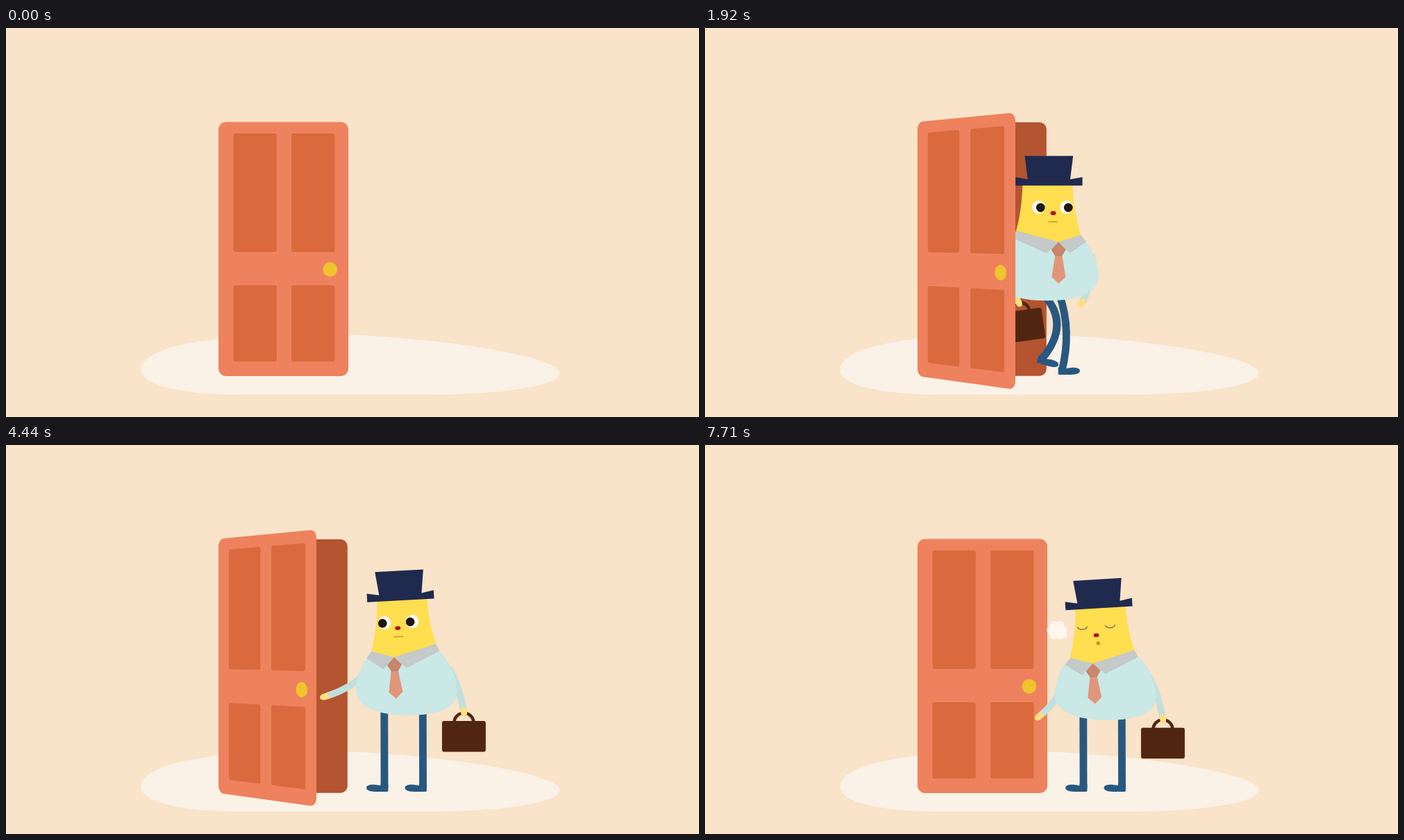
Recreate the animation shown at these times as an HTML page with a canvas. Size 998x561 px, loop 8000 ms.

```html
<!DOCTYPE html>
<html lang="en">
<head>
<meta charset="utf-8">
<title>Door</title>
<style>
  html, body { margin: 0; width: 100%; height: 100%; overflow: hidden; background: #f9e3c9; }
  canvas { display: block; width: 998px; height: 561px; }
</style>
</head>
<body>
<canvas id="stage" width="998" height="561"></canvas>
<script>
const ctx = document.getElementById('stage').getContext('2d');
const LOOP = 8000, TURN = 3720, MID = 577.75, WAIST = 382, RAD = Math.PI / 180;
const C = {
  wall: '#f9e3c9', floor: '#faf1e7', door: '#ee825e', panel: '#da6a3d', knob: '#f0c42d',
  hole: '#b45431', shirt: '#c9e8e6', sleeve: '#c2dfde', skin: '#ffde4f', hand: '#ffdf7f',
  collar: '#c4c9c9', knot: '#c9866a', tie: '#e0967a', hat: '#1f2a4e', leg: '#28587f',
  bag: '#512611', nose: '#b5121b', mouth: '#bf9724', lid: '#8d8158', puff: '#fff7ef', pupil: '#24150f'
};

const clamp = (v, a, b) => Math.max(a, Math.min(b, v));
const part = (t, a, b) => clamp((t - a) / (b - a), 0, 1);
const smooth = p => p * p * (3 - 2 * p);
const easeOut = p => 1 - (1 - p) ** 3;
const mix = (a, b, p) => a + (b - a) * p;

function fill(d, color) {
  ctx.fillStyle = color;
  ctx.fill(new Path2D(d));
}
function poly(pts, color) {
  ctx.fillStyle = color;
  ctx.beginPath();
  pts.forEach(([x, y]) => ctx.lineTo(x, y));
  ctx.closePath();
  ctx.fill();
}
// Outline with two equal halves; points are offsets from the axis.
function even(axis, pts, color) {
  const right = pts.map(([x, y]) => [axis + x, y]);
  const left = pts.map(([x, y]) => [axis - x, y]).reverse();
  poly([...right, ...left], color);
}
function oval(x, y, rx, ry, color, turn = 0) {
  ctx.fillStyle = color;
  ctx.beginPath();
  ctx.ellipse(x, y, rx, ry, turn, 0, 7);
  ctx.fill();
}
function arch(x, y, rx, ry, from, to, width, color) {
  ctx.strokeStyle = color;
  ctx.lineWidth = width;
  ctx.beginPath();
  ctx.ellipse(x, y, rx, ry, 0, from, to);
  ctx.stroke();
}
function box(x, y, w, h, r, color) {
  ctx.fillStyle = color;
  ctx.beginPath();
  ctx.roundRect(x, y, w, h, r);
  ctx.fill();
}
function bend(x1, y1, cx, cy, x2, y2, width, color) {
  ctx.strokeStyle = color;
  ctx.lineWidth = width;
  ctx.beginPath();
  ctx.moveTo(x1, y1);
  ctx.quadraticCurveTo(cx, cy, x2, y2);
  ctx.stroke();
}
function scoped(fn) {
  ctx.save();
  fn();
  ctx.restore();
}
function mirror() {
  ctx.translate(2 * MID, 0);
  ctx.scale(-1, 1);
}

// Door leaf, hinged on its left edge and seen in perspective.
const DOOR = { x: 306, y: 135.5, w: 187, h: 366.5, eye: 286 };

function drawLeaf(open) {
  const cut = 46 * open * open, k = 0.01475 * cut ** 0.45, w = DOOR.w - cut;
  const project = (x, y) => {
    const u = (x - DOOR.x) / DOOR.w, s = 1 / (1 - k * u);
    return [DOOR.x + w * u * (1 - k) * s, DOOR.eye + (y - DOOR.eye) * s];
  };
  const slab = (x, y, w, h, r, color) => {
    const pts = [];
    for (let i = 0; i < 36; i++) {
      const q = Math.floor(i / 9), a = (q + (i % 9) / 8) * Math.PI / 2;
      const cx = q === 0 || q === 3 ? x + w - r : x + r;
      const cy = q < 2 ? y + h - r : y + r;
      pts.push(project(cx + r * Math.cos(a), cy + r * Math.sin(a)));
    }
    poly(pts, color);
  };
  slab(DOOR.x, DOOR.y, DOOR.w, DOOR.h, 11, C.door);
  for (const x of [327.5, 411]) {
    slab(x, 152, 62.5, 171, 3, C.panel);
    slab(x, 371, 62.5, 110, 3, C.panel);
  }
  slab(456.5, 337.8, 20.6, 20.6, 10.3, C.knob);
}

function drawRoom() {
  ctx.fillStyle = C.wall;
  ctx.fillRect(0, 0, 998, 561);
  fill('M194.5 493C194.5 462 280 441.5 450 441.5C590 441.5 797.5 471 797.5 497.5' +
       'C797.5 517 710 529 600 529L345 529C260 529 194.5 517 194.5 493Z', C.floor);
}

// A stride swings one foot for half a cycle, then rests it for the other half.
const STRIDE = 113, CYCLE = 763, WALK_END = 2453;

function footAt(t, begin, from, rest) {
  const cycles = (Math.min(t, WALK_END) - begin) / CYCLE, n = Math.floor(cycles);
  const swing = Math.min(1, (cycles - n) * 2), settle = part(t, 2640, 3030);
  const x = from + STRIDE * (n + smooth(swing));
  return {
    x: mix(x, rest, smooth(settle)),
    lift: 12 * Math.sin(Math.PI * swing) + 5 * Math.sin(Math.PI * settle)
  };
}

function drawLegs(t, shift, dy, walk) {
  const back = footAt(t, 1690, 410, 555), front = footAt(t, 1690 + CYCLE / 2, 514, 610.5);
  const half = clamp((front.x - back.x - 16) * 0.8, -27.75, 27.75);
  [[back, -half], [front, half]].forEach(([foot, side]) => {
    const hip = 583 + shift + side, top = 384 + dy;
    const tilt = clamp((hip - foot.x - 5) * 1.1, 0, 30) + foot.lift * 1.5;
    const y = 494.5 - tilt * 0.27 - foot.lift;
    const knee = (hip + foot.x) / 2 + walk * (16 + foot.lift * 2.2);
    bend(hip, top, knee, (top + y) / 2 - 4 * walk, foot.x, y, 10.8, C.leg);
    scoped(() => {
      ctx.translate(foot.x, y);
      ctx.rotate(tilt * RAD);
      fill('M-5.4 -5L-5.4 4Q-5.4 5.3 -4 5.4L13 5.6C22 5.2 26 3 26 0C26 -4 20 -5 13 -4.6L5.4 -3.4L5.4 -6Z', C.leg);
    });
  });
}

function drawBag(x, y, turn) {
  scoped(() => {
    ctx.translate(x, y);
    ctx.rotate(turn * RAD);
    arch(0, 14.5, 14, 14, Math.PI, 0, 4.6, C.bag);
    box(-31.5, 12, 63, 44.5, 3, C.bag);
  });
}

function drawArm(sx, sy, cx, cy, hx, hy) {
  const a = Math.atan2(hy - cy, hx - cx);
  bend(sx, sy, cx, cy, hx - 3 * Math.cos(a), hy - 3 * Math.sin(a), 9.6, C.sleeve);
  oval(hx, hy, 7, 4.7, C.hand, a);
}

function drawSwing(t) {
  const s = Math.cos(2 * Math.PI * (t - 1920) / CYCLE) * (1 - smooth(part(t, 2250, 2600)));
  const x = 505 + 30 * s, y = 392 + 2 * s;
  drawBag(x, y, 2 - 10 * s);
  drawArm(520, 325, 505 + 10 * s, 355, x, y);
  drawArm(640, 325, 653 - 8 * s, 360, 651.5 - 25.5 * s, 392 + 3 * s);
}

function drawReach(reach, pull) {
  drawBag(659.4, 386, 0);
  drawArm(638, 322, 653, 348, 659.4, 385);
  const x = mix(mix(504, 448, reach), 481, pull), y = mix(mix(392, 356, reach), 382, pull);
  drawArm(522, 325, 500 + 6 * pull, 350 + 12 * pull, x, y);
}

function drawEyes(closed) {
  for (const x of [564, 604]) {
    if (closed) arch(x + 0.5, 251, 7, 4.8, 0.1, Math.PI - 0.1, 1.7, C.lid);
    else {
      oval(x, 257, 9.4, 9.4, '#fff');
      oval(x + 2.7, 257.5, 6.4, 6.4, C.pupil);
    }
  }
}

function drawHead(t) {
  fill('M541 222C540 250 537 272 531.5 291L592.5 308L624.5 297C618 272 613 250 613 222Z', C.skin);
  fill('M531.5 291L592.5 307L575.5 323.5L526.8 301.5ZM592.5 307L624.5 297L632.5 306.5L609 323.5Z', C.collar);
  even(592.8, [[4.8, 325], [10, 357.5], [0, 367]], C.tie);
  even(592.6, [[0, 307], [10.6, 318], [4.9, 327.5]], C.knot);
  even(578.8, [[34.8, 183], [30.6, 216.8], [48.2, 213.5], [48.2, 225.8]], C.hat);
  drawEyes(t >= 6870);
  oval(585, 265.5, 4, 2.9, C.nose);
  if (t < 7320) box(578, 277.2, 13.5, 1.5, 0.5, C.mouth);
  else oval(583, 277.5, 2.8, 2.8, C.mouth);
}

function drawPuff(p) {
  if (!p) return;
  scoped(() => {
    ctx.translate(526 - 19 * p, 274 - 7 * p);
    ctx.scale(p, p);
    oval(0, 0, 10, 10, C.puff);
    for (let i = 0; i < 6; i++) {
      const a = i * Math.PI / 3;
      oval(8.6 * Math.cos(a), 8 * Math.sin(a), 6.3, 6, C.puff);
    }
    poly([[4, 11], [12, 4], [15.5, 10.5]], C.puff);
  });
}

function drawMan(t) {
  const left = t >= TURN;
  const shift = Math.min(0, (t - 2485) * 0.148);
  const walk = 1 - smooth(part(t, 2640, 3030));
  const reach = easeOut(part(t, 4230, 4730)), pull = part(t, 5040, 5460);
  const sag = smooth(part(t, 7320, 7710));
  const bob = 1.75 + 1.75 * Math.cos(4 * Math.PI * (t - 1920) / CYCLE);
  const dy = -2 + walk * bob + 7 * sag;
  const tilt = -3.8 * reach * (1 - part(t, 5040, 6120)) - 3.5 * sag;

  scoped(() => {
    ctx.translate(shift, left ? 9.7 * sag : dy);
    if (left) drawReach(reach, pull);
    else drawSwing(t);
  });
  scoped(() => {
    if (left) mirror();
    drawLegs(t, shift, dy, walk);
  });
  scoped(() => {
    ctx.translate(shift, dy);
    scoped(() => {
      const skew = -Math.sin(tilt * RAD) / 2;
      ctx.transform(1, 0, skew, 1, -skew * 391, 0);
      if (left) mirror();
      fill('M528 300C515 315 505 332 505 357C505 382 535 391.7 575 391.7' +
           'C622 391.7 650.5 380 650.5 355C650.5 338 642 320 631 306Z', C.shirt);
    });
    ctx.translate(MID, WAIST);
    ctx.rotate(tilt * RAD);
    ctx.scale(1, 1 - 0.027 * sag);
    ctx.translate(-MID, -WAIST);
    if (left) mirror();
    drawHead(t);
  });
  drawPuff(smooth(part(t, 7440, 7690)));
}

function draw(t) {
  const open = part(t, 30, 1080) - part(t, 5040, 6120);
  drawRoom();
  if (open > 0) box(306.5, 136, 185.3, 365.7, 10, C.hole);
  if (t > 1080 && t < TURN) scoped(() => {
    ctx.beginPath();
    ctx.rect(330, 0, 668, 561);
    ctx.clip();
    drawMan(t);
  });
  drawLeaf(open);
  if (t >= TURN) drawMan(t);
}

const start = performance.now();
function tick() {
  draw((performance.now() - start) % LOOP);
  requestAnimationFrame(tick);
}
tick();
</script>
</body>
</html>
```
